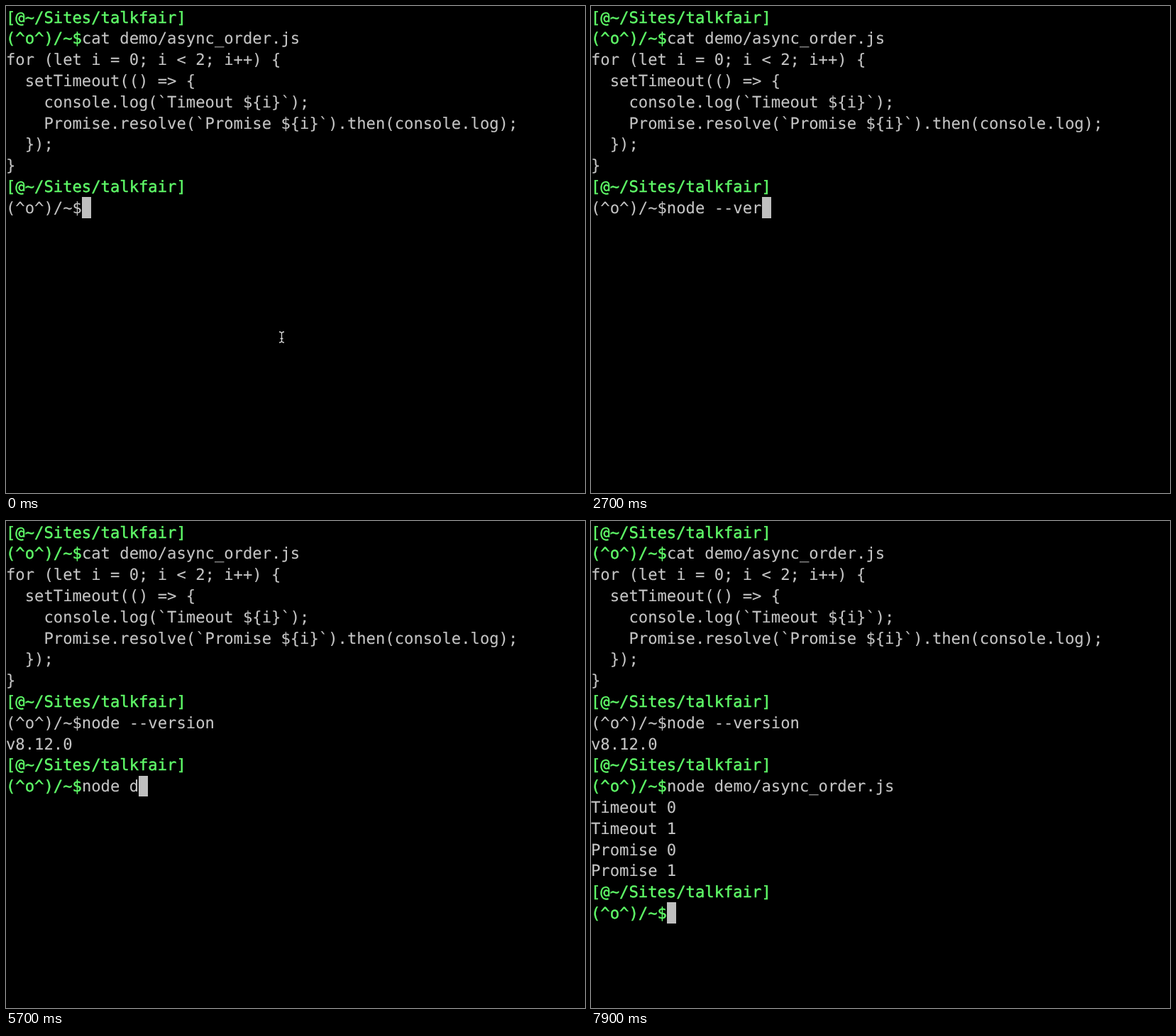
Animation of 816x686 px, one loop 8000 ms. Source, as an HTML page:

```html
<!DOCTYPE html>
<html lang="en">
<head>
<meta charset="utf-8">
<title>Terminal</title>
<style>
  html, body { margin: 0; width: 100%; height: 100%; overflow: hidden; background: #000; }
  svg { display: block; width: 816px; height: 686px; background: #000; }
  text {
    font: 22.2px "DejaVu Sans Mono", "Liberation Mono", monospace;
    white-space: pre;
    text-rendering: geometricPrecision;
    fill: #c5c5c5;
    stroke: #c5c5c5;
    stroke-width: 0.1px;
  }
  .bold { fill: #5ffa68; stroke: #5ffa68; stroke-width: 0.45px; }
  #cursor { fill: #bfbfbf; }
  #pointer { fill: none; stroke: #d8d8d8; stroke-width: 1.3px; }
</style>
</head>
<body>
<svg viewBox="0 0 816 686">
  <g id="screen"></g>
  <rect id="cursor"/>
  <path id="pointer" d="M385 459q3.5 0 3.5 3v9q0 3 -3.5 3M392 459q-3.5 0 -3.5 3M392 474q-3.5 0 -3.5 -3M386.5 468.5h4"/>
</svg>
<script>
const LOOP = 8000, CHAR = 13.365, ROW = 29.8, TOP = 0.95, BASE = 22.7;
const TYPING = 700, VERSION = 3500, RESULT = 7500;
const PROMPT = '(^o^)/~$';
const PATH = '[@~/Sites/talkfair]';
const SCRIPT = 'async_order.js';

const svgEl = (tag, parent) =>
  parent.appendChild(document.createElementNS('http://www.w3.org/2000/svg', tag));
const screen = document.getElementById('screen');
const cursor = document.getElementById('cursor');
const pointer = document.getElementById('pointer');
const rows = [];

// A row has a bold part, a plain part, and chunks typed at a steady pace.
function add(at, bold, plain = '', typed = []) {
  const el = svgEl('text', screen);
  el.setAttribute('y', TOP + BASE + rows.length * ROW);
  const head = svgEl('tspan', el);
  head.setAttribute('class', 'bold');
  head.textContent = bold;
  rows.push({ at, bold, plain, typed, el, tail: svgEl('tspan', el) });
}

const chunk = (text, from, to) => ({ text, from, to });
const print = (at, ...lines) => lines.forEach(line => add(at, '', line));

add(0, PATH);
add(0, PROMPT, 'cat demo/' + SCRIPT);
print(0,
  'for (let i = 0; i < 2; i++) {',
  '  setTimeout(() => {',
  '    console.log(`Timeout ${i}`);',
  '    Promise.resolve(`Promise ${i}`).then(console.log);',
  '  });',
  '}');
add(0, PATH);
add(0, '', PROMPT, [chunk('node -', TYPING, 1800), chunk('-version', 1800, 3400)]);
print(VERSION, 'v8.12.0');
add(VERSION, PATH);
add(VERSION, PROMPT, '', [
  chunk('node', 4500, 5000), chunk(' demo/', 5000, 6600), chunk(SCRIPT, 6600, 7200)
]);
print(RESULT, 'Timeout 0', 'Timeout 1', 'Promise 0', 'Promise 1');
add(RESULT, PATH);
add(RESULT, PROMPT);

function typedPart({ text, from, to }, t) {
  const part = Math.min(1, Math.max(0, (t - from) / (to - from)));
  return text.slice(0, Math.floor(part * text.length));
}

function placeCursor(column, row) {
  const x = Math.round(column * CHAR), y = Math.round(TOP + row * ROW);
  cursor.setAttribute('x', x);
  cursor.setAttribute('y', y);
  cursor.setAttribute('width', Math.round((column + 1) * CHAR) - x);
  cursor.setAttribute('height', Math.round(TOP + (row + 1) * ROW) - y);
}

function draw(t) {
  rows.forEach((row, i) => {
    const on = t >= row.at;
    row.el.style.display = on ? '' : 'none';
    if (!on) return;
    const text = row.plain + row.typed.map(part => typedPart(part, t)).join('');
    if (row.tail.textContent !== text) row.tail.textContent = text;
    placeCursor(row.bold.length + text.length, i);
  });
  pointer.style.display = t < TYPING ? '' : 'none';
}

const start = performance.now();
function tick() {
  draw((performance.now() - start) % LOOP);
  requestAnimationFrame(tick);
}
draw(0);
requestAnimationFrame(tick);
</script>
</body>
</html>
```
